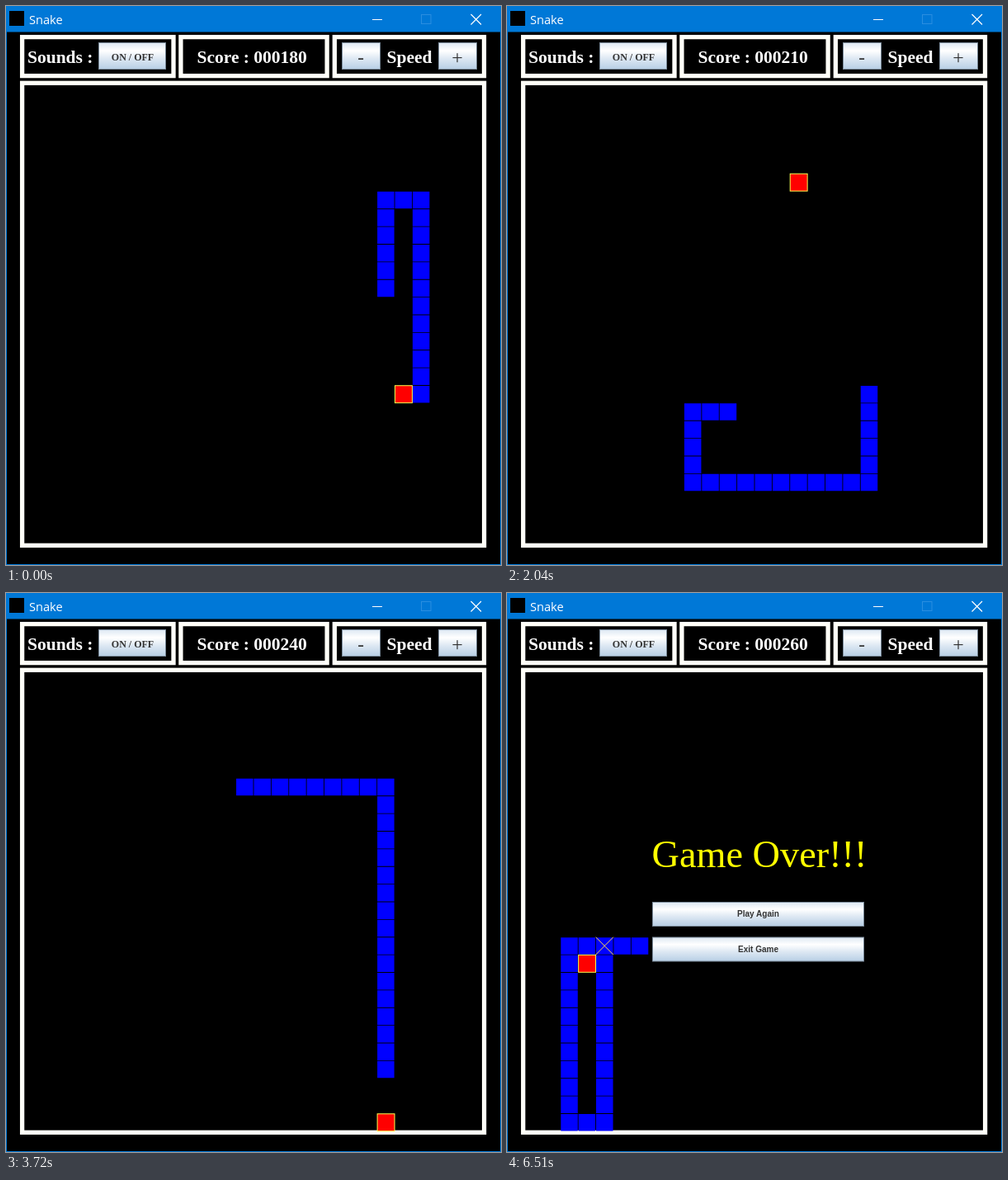
These frames come from a looping animation (600x677 px, 6600 ms). An HTML page:

```html
<!DOCTYPE html>
<html lang="en">
<head>
<meta charset="utf-8">
<title>Snake</title>
<style>
  html, body { margin: 0; width: 100%; height: 100%; overflow: hidden; background: #000; }
  svg { display: block; width: 600px; height: 677px; }
  .serif { font-family: "Liberation Serif", "Times New Roman", serif; }
  .label { font-size: 21.5px; font-weight: bold; fill: #fff; }
  .mid { text-anchor: middle; fill: #333; }
  .menu { font: bold 10px "Liberation Sans", Arial, sans-serif; }
  .button { fill: url(#metal); stroke: #7a8a99; }
  .panel { fill: none; stroke: #fffff8; stroke-width: 5.3; }
</style>
</head>
<body>
<svg viewBox="0 0 600 677">
  <defs>
    <linearGradient id="metal" x2="0" y2="1">
      <stop offset="0" stop-color="#dde8f3"/>
      <stop offset=".3" stop-color="#fff"/>
      <stop offset=".6" stop-color="#dde8f3"/>
      <stop offset="1" stop-color="#b8cfe5"/>
    </linearGradient>
  </defs>

  <rect width="600" height="677" fill="#0078d7"/>
  <rect x="1" y="31.5" width="598" height="644.5"/>
  <rect x="4" y="6" width="18" height="18"/>
  <text x="28" y="22" fill="#fff" style="font: 14.6px 'Open Sans', 'Noto Sans', sans-serif">Snake</text>
  <g fill="none" stroke="#fff">
    <path d="M444 16.5h12"/>
    <rect x="503.5" y="10.5" width="11.5" height="11" stroke="#2a8ee0"/>
    <path d="M563.5 10l12.5 12.5M576 10l-12.5 12.5" stroke-width="1.2"/>
  </g>

  <g class="panel">
    <rect x="19.6" y="37.6" width="183.4" height="47"/>
    <rect x="211.9" y="37.6" width="177.2" height="47"/>
    <rect x="398.3" y="37.6" width="181.2" height="47"/>
    <rect x="19.6" y="93.3" width="560" height="560"/>
  </g>

  <g class="button">
    <rect x="112.5" y="44.5" width="81" height="32"/>
    <rect x="407.5" y="44.5" width="46" height="32"/>
    <rect x="524.5" y="44.5" width="46" height="32"/>
  </g>
  <g class="serif">
    <text class="label" x="26" y="69">Sounds :</text>
    <text class="label" x="231.5" y="69" id="score"></text>
    <text class="label" x="461.5" y="69">Speed</text>
    <text class="mid" x="153.5" y="66" font-size="12" font-weight="bold">ON / OFF</text>
    <text class="mid" x="430" y="70" font-size="23">-</text>
    <text class="mid" x="547" y="70" font-size="24">+</text>
  </g>

  <path id="snake" fill="#00f"/>
  <rect id="food" width="20.9" height="20.9" fill="#f00" stroke="#ffff50"/>

  <g id="over">
    <path id="cross" fill="none" stroke="#ffd94a"/>
    <text class="serif" x="175.5" y="332" font-size="46.3" fill="#ff0">Game Over!!!</text>
  </g>
  <g id="menu">
    <rect class="button" x="176.5" y="374.5" width="256" height="29"/>
    <rect class="button" x="176.5" y="417" width="256" height="29"/>
    <text class="mid menu" x="304.5" y="392.3">Play Again</text>
    <text class="mid menu" x="304.5" y="435">Exit Game</text>
  </g>
</svg>
<script>
const LOOP = 6600, TICK = 30, OVER_AT = 5340, MENU_AT = 6030;
const CELL = 21.38, LEFT = 22, TOP = 96;
const START_LENGTH = 19, START_SCORE = 180;

// Corners of the route as "column,row"; a star marks a meal.
const route = `22,17 22,6 20,6 20,11 20,17 21,17* 21,24 0,24 0,7* 11,7 11,18 9,18 9,22* 19,22
  19,5 15,5* 15,8 17,8 17,11 8,11 8,19 6,19* 6,6 8,6* 20,6 20,25* 2,25 2,16 15,16 15,15*
  2,15 2,25 4,25 4,15`.split(/\s+/);

// Steps taken by given times, in ms.
const pace = [[0, 0], [810, 27], [2040, 95], [2970, 142], [4470, 220], [5130, 251], [5310, 260]];

const cells = [], meals = [];
for (const corner of route) {
  const [col, row] = corner.split(',').map(parseFloat);
  if (!cells.length) cells.push([col, row]);
  let [c, r] = cells[cells.length - 1];
  while (c !== col || r !== row) {
    c += Math.sign(col - c);
    r += Math.sign(row - r);
    cells.push([c, r]);
  }
  if (corner.endsWith('*')) meals.push(cells.length - 1);
}
const foods = [...meals.map(i => cells[i]), [3, 16]];

const $ = id => document.getElementById(id);
const px = col => LEFT + col * CELL;
const py = row => TOP + row * CELL;
const show = (id, on) => $(id).setAttribute('visibility', on ? 'visible' : 'hidden');

function stepsAt(t) {
  for (let i = 1; i < pace.length; i++) {
    const [t0, n0] = pace[i - 1], [t1, n1] = pace[i];
    if (t < t1) return Math.floor(n0 + (n1 - n0) * (t - t0) / (t1 - t0) + 1e-6);
  }
  return pace[pace.length - 1][1];
}

function render(time) {
  const t = Math.floor(time % LOOP / TICK + 1e-6) * TICK;
  const head = START_LENGTH - 1 + stepsAt(t);
  const eaten = meals.filter(i => i <= head).length;
  const body = cells.slice(head + 1 - START_LENGTH - eaten, head + 1);
  const [fc, fr] = foods[eaten];

  $('snake').setAttribute('d', body.map(([c, r]) =>
    `M${px(c) + .5} ${py(r) + .5}h20.5v20.5h-20.5z`).join(''));
  $('food').setAttribute('x', px(fc) + .5);
  $('food').setAttribute('y', py(fr) + .3);
  $('score').textContent = 'Score : ' + String(START_SCORE + 10 * eaten).padStart(6, '0');
  show('over', t >= OVER_AT);
  show('menu', t >= MENU_AT);
}

const [endCol, endRow] = cells[cells.length - 1];
$('cross').setAttribute('d',
  `M${px(endCol)} ${py(endRow)}l${CELL} ${CELL}m0 ${-CELL}l${-CELL} ${CELL}`);

const start = performance.now();
function frame() {
  render(performance.now() - start);
  requestAnimationFrame(frame);
}
frame();
</script>
</body>
</html>
```
